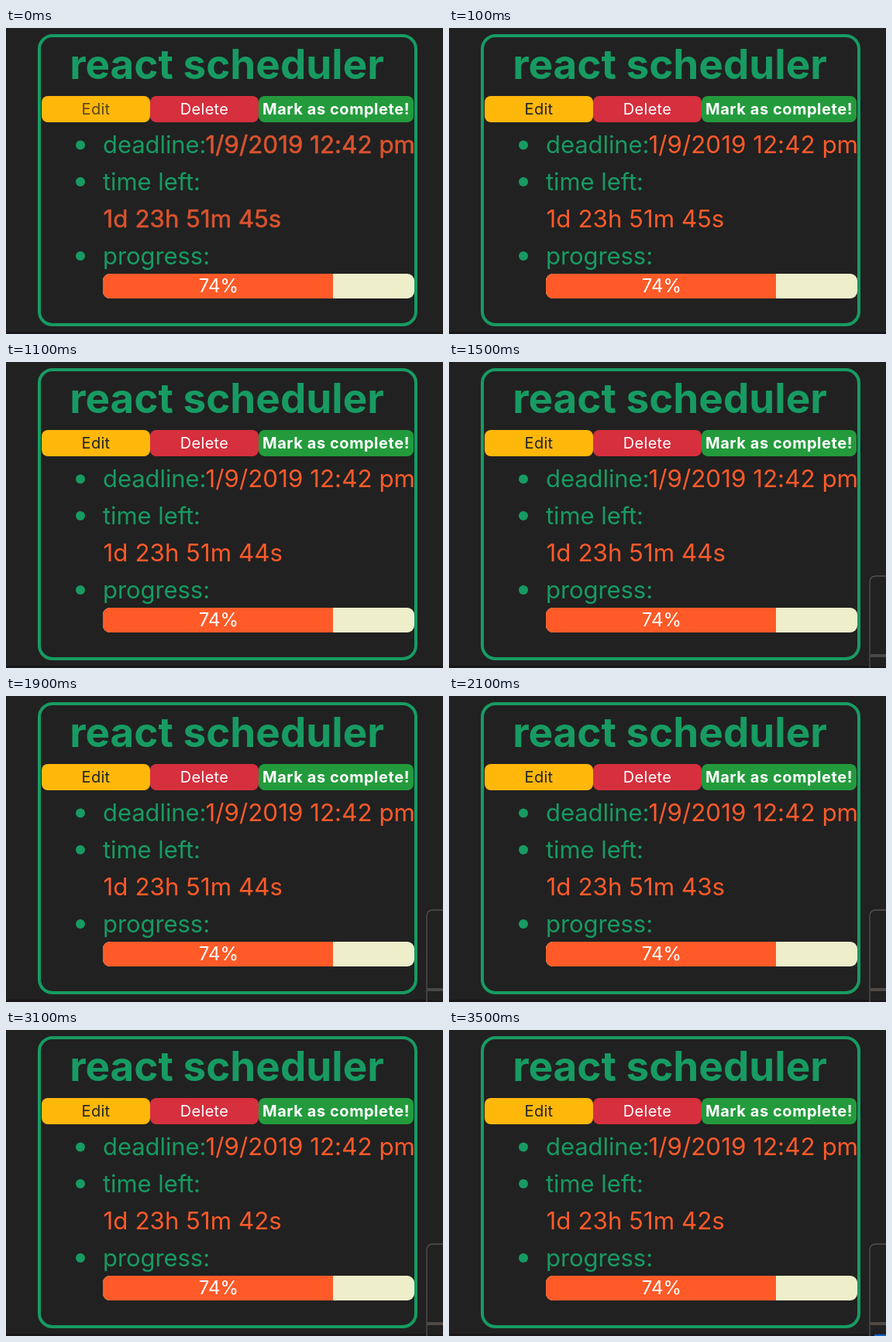
These frames come from a looping animation (564 px wide and 396 px high, 3600 ms). An HTML page:

```html
<!DOCTYPE html>
<html lang="en">
<head>
<meta charset="utf-8">
<title>Scheduler card</title>
<style>
  html, body { margin: 0; width: 100%; height: 100%; overflow: hidden; background: #212121; }
  svg { display: block; width: 564px; height: 396px; }
  text {
    font-family: Inter, "Liberation Sans", sans-serif;
    font-optical-sizing: none;
    font-feature-settings: "calt" 0;
  }

  .green { fill: #179b62; }
  .red { fill: #ff5a2a; }
  .title { font-size: 53px; font-weight: 700; }
  .row { font-size: 31px; letter-spacing: -.07px; }
  .value { font-size: 31.3px; letter-spacing: .04px; }
  .button { font-size: 20px; letter-spacing: .3px; }
  .strong { font-weight: 700; letter-spacing: .55px; }
  .percent { font-size: 24px; }
  .mid { text-anchor: middle; }

  .loop, .red, .ink { animation: 3600ms step-end infinite; }
  .red { animation-name: red; }
  .ink { fill: #212529; animation-name: ink; }
  .s45 { animation-name: red, s45; }
  .s44 { animation-name: red, s44; }
  .s43 { animation-name: red, s43; }
  .s42 { animation-name: red, s42; }
  .card { animation-name: focus; }
  .panel { animation-name: panel; }
  .rule { animation-name: rule; }
  .edge { animation-name: edge; }

  /* The first 100 ms are soft and slightly muted. */
  @keyframes focus { 0% { filter: blur(.6px); } 2.77%, 100% { filter: none; } }
  @keyframes red {
    0% { fill: #d9532f; stroke: #d9532f; stroke-width: .6px; }
    2.77%, 100% { fill: #ff5a2a; stroke: none; }
  }
  @keyframes ink { 0% { fill: #5a4714; } 2.77%, 100% { fill: #212529; } }

  @keyframes s45 { 0% { opacity: 1; } 27.77%, 100% { opacity: 0; } }
  @keyframes s44 { 0% { opacity: 0; } 27.77% { opacity: 1; } 55.55%, 100% { opacity: 0; } }
  @keyframes s43 { 0% { opacity: 0; } 55.55% { opacity: 1; } 83.33%, 100% { opacity: 0; } }
  @keyframes s42 { 0% { opacity: 0; } 83.33%, 100% { opacity: 1; } }
  @keyframes panel { 0% { opacity: 0; } 41.66%, 100% { opacity: 1; } }
  @keyframes rule { 0% { fill: #484848; } 55.55%, 100% { fill: #4f4a46; } }
  @keyframes edge { 0% { opacity: 0; } 97.22%, 100% { opacity: 1; } }
</style>
</head>
<body>
<svg viewBox="0 0 564 396">
  <defs>
    <clipPath id="bar"><rect x="125" y="318" width="402" height="32" rx="9"/></clipPath>
  </defs>
  <rect width="564" height="396" fill="#212121"/>
  <rect y="393" width="564" height="3" fill="#1a171b"/>

  <g class="loop card">
    <rect x="43" y="10" width="486" height="374" rx="17" fill="none" stroke="#179b62" stroke-width="4"/>
    <text class="title green mid" x="285" y="66">react scheduler</text>

    <rect x="46" y="88" width="140" height="34" rx="8" fill="#ffb70a"/>
    <rect x="186" y="88" width="140" height="34" rx="8" fill="#d62f3e"/>
    <rect x="326" y="88" width="200" height="34" rx="8" fill="#239b3c"/>
    <text class="button ink mid" x="116" y="112">Edit</text>
    <text class="button mid" x="256" y="112" fill="#fff">Delete</text>
    <text class="button strong mid" x="426" y="112" fill="#fff">Mark as complete!</text>

    <g class="green">
      <circle cx="96" cy="151.5" r="6"/>
      <circle cx="96" cy="199" r="6"/>
      <circle cx="96" cy="295" r="6"/>
      <text class="row" x="125" y="162">deadline:</text>
      <text class="row" x="125" y="210">time left:</text>
      <text class="row" x="125" y="306">progress:</text>
    </g>

    <text class="value red" x="257.4" y="162">1/9/2019 12:42 pm</text>
    <text class="value red s45" x="125.6" y="258">1d 23h 51m 45s</text>
    <text class="value red s44" x="125.6" y="258">1d 23h 51m 44s</text>
    <text class="value red s43" x="125.6" y="258">1d 23h 51m 43s</text>
    <text class="value red s42" x="125.6" y="258">1d 23h 51m 42s</text>

    <g clip-path="url(#bar)">
      <rect x="125" y="318" width="402" height="32" fill="#eeeecb"/>
      <rect x="125" y="318" width="297" height="32" fill="#ff5a28"/>
    </g>
    <text class="percent mid" x="274.4" y="342" fill="#fff">74%</text>
  </g>

  <g class="loop panel">
    <path d="M542 396V284q0-8 8-8H564V396Z" fill="#1a1a1a"/>
    <path d="M543 396V285q0-8 8-8H566V398Z" fill="#212121" stroke="#55534f" stroke-width="1.3"/>
    <rect class="loop rule" x="543" y="378" width="21" height="4"/>
    <rect x="544" y="394" width="20" height="2" fill="#1a171b"/>
    <rect class="loop edge" x="549" y="394" width="15" height="2" fill="#0d62d0"/>
  </g>
</svg>
</body>
</html>
```
